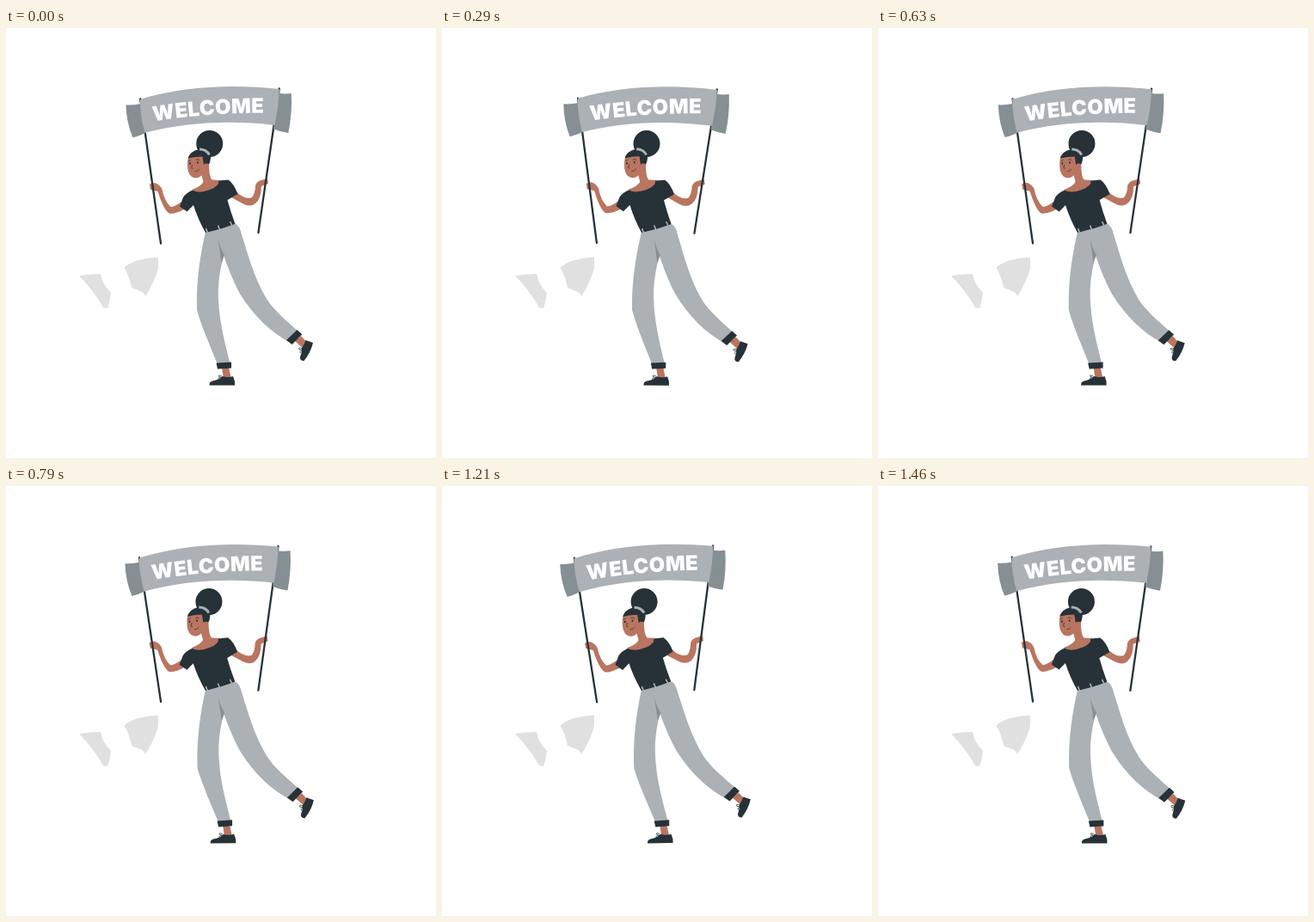
These frames come from a looping animation (500x500 px, 1500 ms). An HTML page:

```html
<!DOCTYPE html>
<html lang="en">
<head>
<meta charset="utf-8">
<title>Welcome</title>
<style>
  html, body { margin: 0; width: 100%; height: 100%; overflow: hidden; background: #fff; }
  svg { display: block; width: 100%; height: 100%; }
  .dark { fill: #263238; }
  .skin { fill: #b97560; }
  .cloth { fill: #abb1b5; }
  .shade { fill: #868f93; }
  .line { fill: none; stroke: #263238; stroke-linecap: round; }
  .pale { fill: none; stroke: #a9b3b3; }
  .sign { font: 900 23.8px Inter, Roboto, sans-serif; letter-spacing: .35px; fill: #fff; }
</style>
</head>
<body>
<svg viewBox="0 0 500 500">
  <defs>
    <path id="base" d="M171.700 108.700 Q236 98 310 98.700"/>
  </defs>

  <g fill="#e0e0e0">
    <path d="M85 288 Q98 286 110 286 L112 294 Q117 303 122 308 Q121 317 118 326 L113 325 Q101 304 85 288Z"/>
    <path d="M137.500 278.500 Q144 273 152 270.500 Q164 267 177 266.500 L177 279 Q173 295 162 312 Q160 307 156 306 L146 302 Q144 290 137.500 278.500Z"/>
  </g>

  <g id="figure">
    <!-- arms -->
    <path class="skin" d="M167 181.500 L173 180 Q179 182 181.500 187.500 Q184 201 191.500 208 Q196 208 204 202 L209 210 Q196 217 189.500 215.500 Q183 211 176.500 190 L168 188Z"/>
    <path class="skin" d="M267 190 Q278 200 286 197 Q290 192 290 183 Q292 178 297 177 L304 175 L305 181 L297 184 Q297 198 290 204 Q284 209 275 204 L262 197Z"/>

    <!-- poles -->
    <path class="line" stroke-width="2.3" d="M156.200 82.500 L180 250.500 M317.700 70.500 L293.400 238"/>

    <!-- banner -->
    <path class="shade" d="M157 88 Q148 90 139.500 89.500 Q140 110 147.300 127.300 Q154 126 163 121.500Z"/>
    <path class="shade" d="M316 75.500 Q324 77 331.800 76 Q333 99 328.300 122 Q320 121 311 117.500Z"/>
    <path class="cloth" d="M155.800 83 C205 68 262 65 318 71 Q317 92 312.500 113 C263 107 209 109 161.500 122 Q156 103 155.800 83Z"/>
    <text class="sign"><textPath href="#base">WELCOME</textPath></text>

    <!-- right leg -->
    <path class="skin" d="M336 364 L343 358 L350 365.500 L345 372Z"/>
    <path class="dark" d="M344 372 Q347 368 348.500 363 L357 366 Q354.500 377 346.500 387 Q341.500 387 342 382.500 Q344 378 344 372Z"/>
    <path class="line" stroke-width=".8" d="M345 373 Q339 370 341 374 L345 374 Q340 377 343 378"/>
    <path class="cloth" d="M248 233 L267.500 228 Q272 231 274 240 C281 262 288 290 303 315 C311 328 327 341 340 353 L331 366 C309 355 288 335 272 309 C264 294 256 275 247 246Z"/>
    <path class="dark" d="M338.500 351 L344.300 356.300 L332.700 368 L326 363Z"/>

    <!-- left leg -->
    <path class="skin" d="M251 395 L259 394 L261.500 406 L253 408Z"/>
    <path class="dark" d="M236.500 415.500 Q236 411.500 240 410.500 Q248 409 252 405 Q258 407 264 405 L266 411 L266 415.500Z"/>
    <path class="line" stroke-width=".8" d="M252 406 Q247 402 247 405 L251 407 Q245 406 247 409"/>
    <path class="cloth" d="M232 237 L252 233 L253 265 C247 288 246 303 247.500 323 C249 345 255 368 260.500 390 L246 391 C238 371 228 349 222 328 C221 294 226 263 232 237Z"/>
    <path class="shade" d="M246.500 246 Q249 256 254 264 L250.500 273 Q249 259 246.500 246Z"/>
    <path class="dark" d="M244.500 389.500 L262 388.500 L262 395.500 L246 396.500Z"/>

    <!-- neck and shirt -->
    <path class="skin" d="M226 166 L236 157 Q236 173 239.500 176.500 L249 177 Q246 190 228 194 L216 188 Q227 184 229.500 179Z"/>
    <path class="dark" d="M217 188.500 Q209 192 206 197 L202 207.500 L210.500 213.500 L218 206 Q223 222 232 238 Q250 234 266.500 228 Q261 213 257.500 200 L269.500 193 Q265 181 258.500 176.500 L247.500 177.500 Q248 184 237 188 Q224 193 217 188.500Z"/>
    <path class="pale" stroke-width="1.6" d="M232.500 233 L234.500 238.500 M246.500 229.500 L248.500 234.500 M260.500 225 L263 230"/>

    <!-- head -->
    <circle class="dark" cx="236.700" cy="134.500" r="15.500"/>
    <path class="skin" d="M212 149 Q210 160 212 167 Q214.500 174.500 221.500 174.500 Q228 173.500 230.500 166 L235 163 L234 148Z"/>
    <path class="dark" d="M211.800 151.500 Q213 144 224 141 Q233 140 237.500 145 Q239 153 236 158.500 Q232 156.500 230 159 L228.500 149.500 Q220 149.500 211.800 151.500Z"/>
    <path class="pale" stroke-width="3" d="M225 141 Q233 141 236.500 147.500"/>
    <path class="line" stroke-width=".7" d="M212.500 154.800 L215 153.700 M221 153.200 Q223 151.800 225 153.500 M216.500 159 L215.700 163 L217.200 163.300 M220 166.800 Q222.500 166.800 224.500 164.500"/>
    <ellipse class="dark" cx="214" cy="157.500" rx=".9" ry="1.300"/>
    <ellipse class="dark" cx="222.800" cy="156.500" rx=".9" ry="1.300"/>
  </g>
</svg>
<script>
  const LOOP = 1500, PEAK = 335, SWING = 0.82, REST = -0.137;
  const figure = document.getElementById('figure');

  // The whole figure rocks about the waist.
  function draw(now) {
    const phase = 2 * Math.PI * (now % LOOP - PEAK) / LOOP;
    const angle = REST + SWING * Math.cos(phase);
    figure.setAttribute('transform', `rotate(${angle.toFixed(4)} 240 243)`);
  }

  let start = null;
  function tick(now) {
    if (start === null) start = now;
    draw(now - start);
    requestAnimationFrame(tick);
  }
  draw(0);
  requestAnimationFrame(tick);
</script>
</body>
</html>
```
